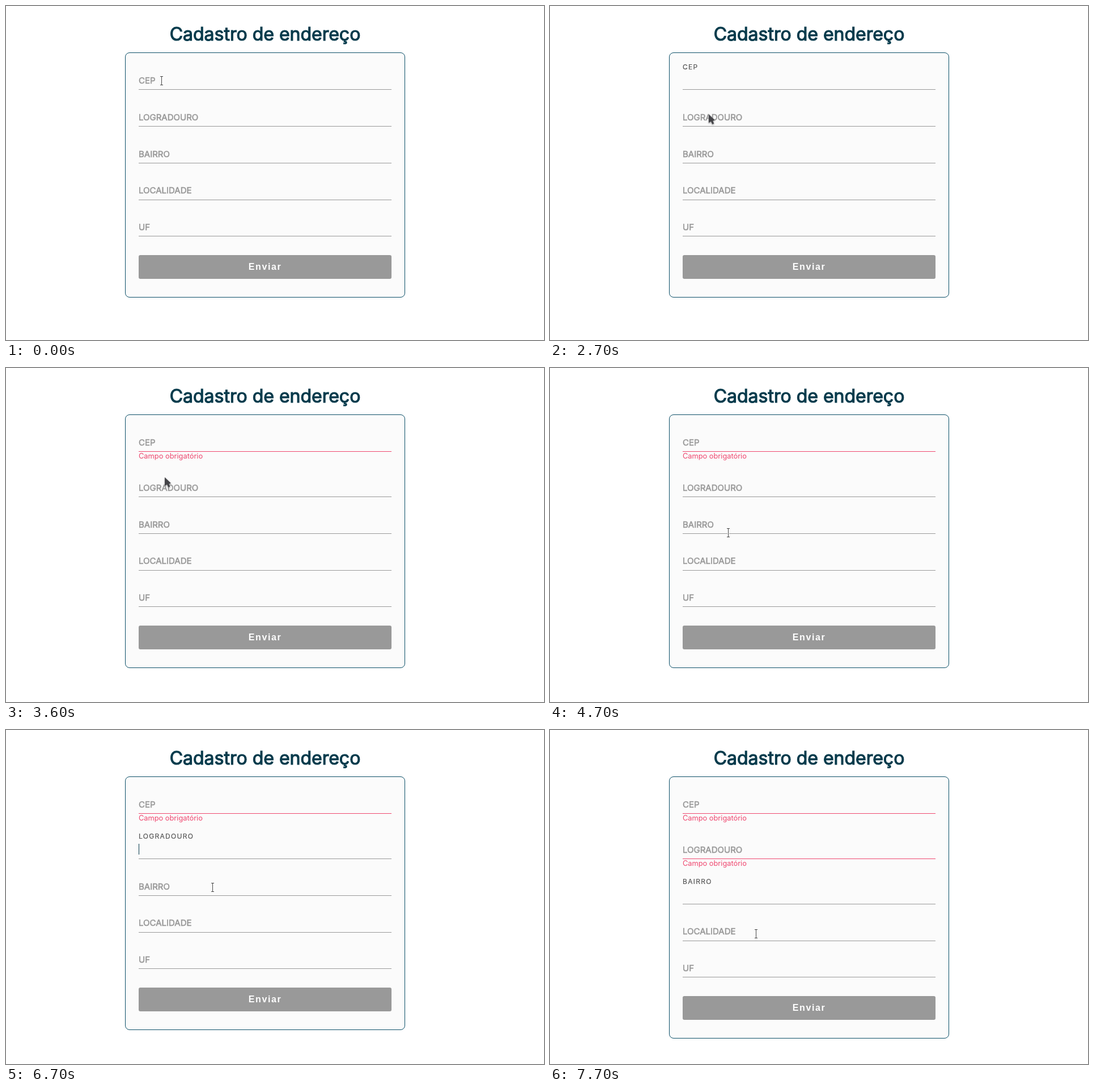
An HTML page that plays this animation: 949 px wide and 590 px high, repeating every 8000 ms.

```html
<!DOCTYPE html>
<html lang="pt-BR">
<head>
<meta charset="utf-8">
<title>Cadastro de endereço</title>
<style>
@property --p { syntax: "<number>"; inherits: true; initial-value: 0; }

html, body { margin: 0; width: 100%; height: 100%; overflow: hidden; background: #fff; }
body { position: relative; color: #073b4c; font: 16px Inter, sans-serif; }

h1 {
  position: absolute; left: 210px; top: 50px; width: 494px; margin: 0;
  font-size: 32px; font-weight: 400; line-height: 0; text-align: center;
  -webkit-text-stroke: 1.2px;
}
.card {
  position: absolute; left: 210px; top: 82px; width: 494px; box-sizing: border-box;
  padding: .5px 23px 32px; border: 1px solid #0b4f68; border-radius: 8px; background: #fbfbfb;
}
.field { position: relative; }
.line { height: 63.8px; border-bottom: 1px solid #999; }

/* --p runs from 0 (resting label) to 1 (floating label) */
label {
  position: absolute; left: 0; top: calc(48.6px - 24px * var(--p));
  font-size: calc(15px - 3px * var(--p)); line-height: 0;
  letter-spacing: calc(1.3px * var(--p));
  color: color-mix(in srgb, #555 calc(100% * var(--p)), #999);
  -webkit-text-stroke: min(.6px, .2px + 40px * (1 - var(--p)));
}
.caret { position: absolute; left: 0; top: 37.6px; width: 1px; height: 19px; background: #073b4c; opacity: 0; }
.error { display: block; font-size: 0; }
button {
  display: block; width: 100%; height: 42px; margin: 32.5px 0 0; padding: 0; border: 0; border-radius: 3px;
  background: #999; color: #fff; font: bold 16px "Liberation Sans", Arial, sans-serif; letter-spacing: 1.6px;
}

.cep label { animation: cep-label 8s infinite; }
.cep .line { animation: cep-line 8s infinite; }
.cep .error { animation: cep-error 8s infinite; }
.cep .caret { animation: cep-caret 8s step-end infinite; }
.log label { animation: log-label 8s infinite; }
.log .line { animation: log-line 8s infinite; }
.log .error { animation: log-error 8s infinite; }
.log .caret { animation: log-caret 8s step-end infinite; }
.bai label { animation: bai-label 8s infinite; }
.bai .caret { animation: bai-caret 8s step-end infinite; }

@keyframes cep-label {
  0%, 5% { --p: 0; }
  6.25%, 7.5% { --p: .55; animation-timing-function: ease-out; }
  11.25%, 40.8% { --p: 1; }
  45.8%, 100% { --p: 0; }
}
@keyframes log-label {
  0%, 66.9% { --p: 0; }
  71.9%, 84.6% { --p: 1; }
  89.6%, 100% { --p: 0; }
}
@keyframes bai-label {
  0%, 84.6% { --p: 0; }
  89.6%, 100% { --p: 1; }
}
@keyframes cep-line {
  0%, 40.8% { border-color: #999; }
  41.4%, 100% { border-color: #ef476f; }
}
@keyframes log-line {
  0%, 84.6% { border-color: #999; }
  85.2%, 100% { border-color: #ef476f; }
}
@keyframes cep-error {
  0% { font-size: 0; color: #073b4c; animation-timing-function: step-end; }
  40.8% { font-size: 16px; color: #073b4c; }
  45.8%, 100% { font-size: 12.8px; color: #ef476f; }
}
@keyframes log-error {
  0% { font-size: 0; color: #073b4c; animation-timing-function: step-end; }
  84.6% { font-size: 16px; color: #073b4c; }
  89.6%, 100% { font-size: 12.8px; color: #ef476f; }
}
@keyframes cep-caret {
  0%, 13%, 27.5%, 40.8%, 100% { opacity: 0; }
  6%, 20.5%, 34.8% { opacity: 1; }
}
@keyframes log-caret {
  0%, 74.2%, 84.6%, 100% { opacity: 0; }
  66.9%, 81.5% { opacity: 1; }
}
@keyframes bai-caret {
  0%, 92%, 100% { opacity: 0; }
  84.6% { opacity: 1; }
}

.cursor { position: absolute; left: 0; top: 0; animation: move 8s ease-in-out infinite; }
.cursor svg { position: absolute; left: -10px; top: -10px; width: 34px; height: 34px; }
.beam { animation: beam 8s step-end infinite; }
.arrow { animation: arrow 8s step-end infinite; filter: drop-shadow(0 1px 1px #0005); }

@keyframes move {
  0% { transform: translate(274px, 132px); animation-timing-function: step-end; }
  1.25%, 25% { transform: translate(274px, 131px); }
  35%, 52.5% { transform: translate(280px, 193px); }
  58.75% { transform: translate(314px, 291px); }
  60%, 61.25% { transform: translate(314px, 296px); }
  66.25%, 67.5% { transform: translate(350px, 212px); }
  71.25%, 72.5% { transform: translate(362px, 235px); }
  78.75%, 89% { transform: translate(364px, 278px); }
  92.5% { transform: translate(363px, 313px); }
  96.25%, 100% { transform: translate(363px, 360px); }
}
@keyframes beam {
  0%, 53.2%, 56.6%, 65%, 76%, 95% { opacity: 1; }
  29%, 55%, 59.4%, 70%, 92.3% { opacity: 0; }
  100% { opacity: 1; }
}
@keyframes arrow {
  0%, 53.2%, 56.6%, 65%, 76%, 95% { opacity: 0; }
  29%, 55%, 59.4%, 70%, 92.3% { opacity: 1; }
  100% { opacity: 0; }
}
</style>
</head>
<body>
<h1>Cadastro de endereço</h1>
<div class="card">
  <div class="field cep"><div class="line"></div><label>CEP</label><i class="caret"></i><span class="error">Campo obrigatório</span></div>
  <div class="field log"><div class="line"></div><label>LOGRADOURO</label><i class="caret"></i><span class="error">Campo obrigatório</span></div>
  <div class="field bai"><div class="line"></div><label>BAIRRO</label><i class="caret"></i></div>
  <div class="field"><div class="line"></div><label>LOCALIDADE</label></div>
  <div class="field"><div class="line"></div><label>UF</label></div>
  <button>Enviar</button>
</div>
<div class="cursor">
  <svg class="beam" viewBox="-10 -10 34 34" fill="none">
    <path id="i" d="M-2 -7.5H3M-2 7.5H3M.5 -7.5V7.5" stroke="#fff" stroke-width="3"/>
    <path d="M-2 -7.5H3M-2 7.5H3M.5 -7.5V7.5" stroke="#444"/>
  </svg>
  <svg class="arrow" viewBox="-10 -10 34 34">
    <path d="M0 0V15.5L4 13L6.5 18L9.5 16.5L7.5 12L11 10.5Z" fill="#444448" stroke="#fff" stroke-width=".8" paint-order="stroke"/>
  </svg>
</div>
<script>
// The screen refreshes ten times a second: sample every animation on that grid.
const LOOP = 8000, STEP = 100;
const anims = document.getAnimations();
anims.forEach(a => a.pause());

function tick() {
  const t = Math.floor(performance.now() % LOOP / STEP) * STEP + 1;
  anims.forEach(a => { a.currentTime = t; });
  requestAnimationFrame(tick);
}
tick();
</script>
</body>
</html>
```
